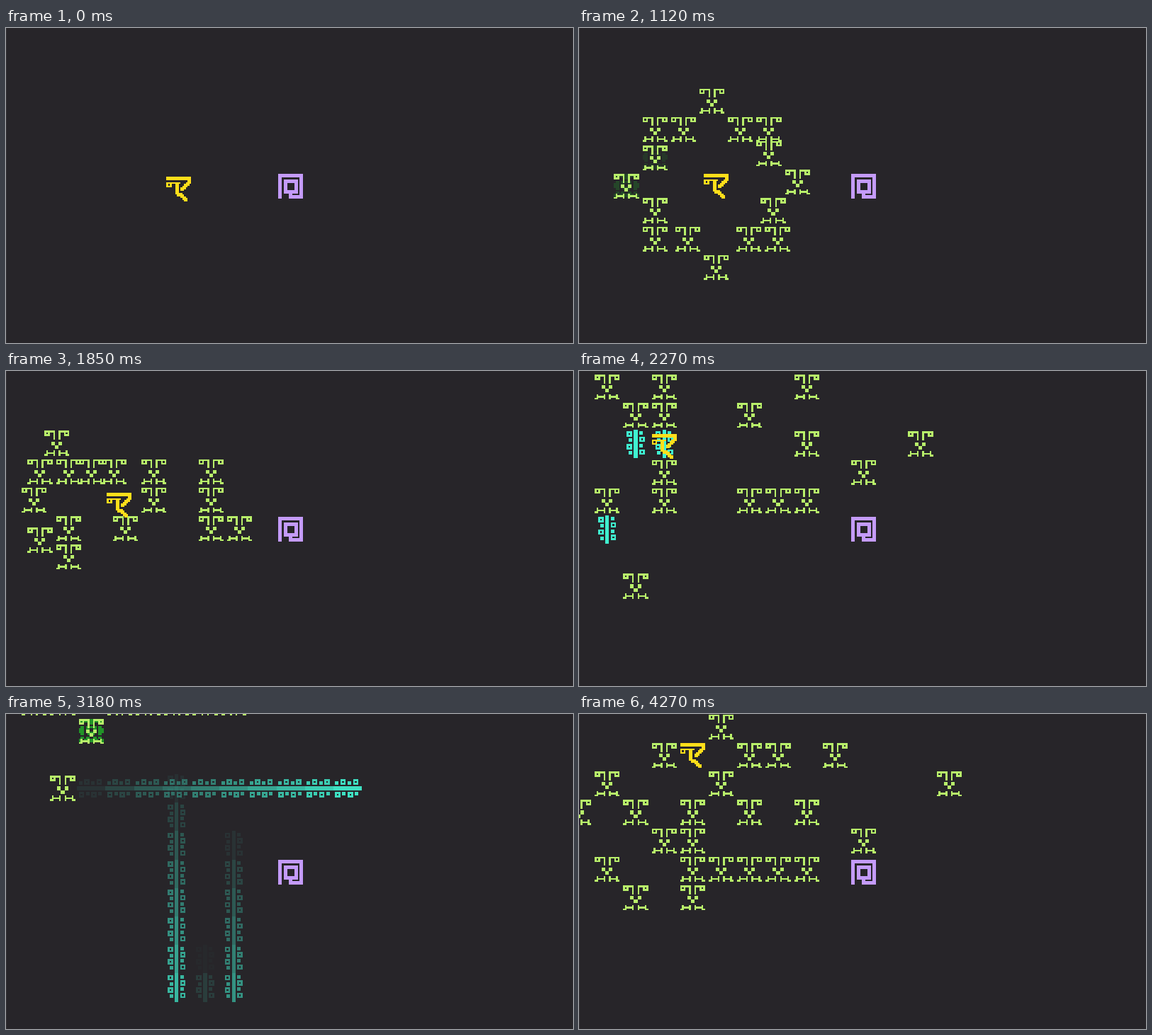
These frames come from a looping animation (800x445 px, 4300 ms). An HTML page with a canvas:

```html
<!DOCTYPE html>
<html lang="en">
<head>
<meta charset="utf-8">
<title>Pixel swarm</title>
<style>
html, body { margin: 0; width: 100%; height: 100%; overflow: hidden; background: #272529; }
canvas { display: block; }
</style>
</head>
<body>
<canvas id="stage" width="800" height="445"></canvas>
<script>
const ctx = document.getElementById('stage').getContext('2d');
const LOOP = 4300, TILE = 40.2, PX = TILE / 16, TAU = Math.PI * 2;
const GREEN = '#b8f06a', BLOB = '#20b428', YELLOW = '#ffde1a', PURPLE = '#c49bfa', CYAN = '#40f4d2';

const mirror = rows => rows.map(r => r + [...r].reverse().join(''));
const CRITTER = mirror([
  '######.', '#.#..#.', '###..#.', '.....#.', '.....#.', '.......', '....##.',
  '....##.', '......#', '......#', '.......', '.#...#.', '.#####.', '##...#.']);
const BURST = mirror([
  '##.####', '##.####', '##...##', '.......', '.##.###', '###.##.', '###.##.',
  '###..##', '.##..##', '.......', '.##.##.', '##.####', '#######', '##.....']);
const BOSS = [
  '##############', '##############', '............##', '########...###', '#.#..##...###.',
  '###..##..###..', '.....##.###...', '.....##.##....', '.....##.......', '.....####.....',
  '......####....', '........###...', '.........###..', '..........##..'];
const HERO = [
  '##############', '##############', '##..........##', '##.########.##', '##.########.##',
  '##.##....##.##', '##.##....##.##', '##.##....##.##', '##.##....##.##', '##.########.##',
  '##.########.##', '##....##....##', '##....########', '##....########'];

const clamp = (v, lo = 0, hi = 1) => Math.max(lo, Math.min(hi, v));
const easeOut = v => 1 - (1 - clamp(v)) ** 3;
const toX = col => col * TILE - 0.4;
const toY = row => row * TILE + 22.8;

// Whole turns taken so far plus the eased part of the current one.
function turns(t, start, step, limit = 99) {
  const n = clamp((t - start) / step, 0, limit);
  return Math.floor(n) + easeOut(n % 1);
}

const walk = (from, to, n) => from.map((v, i) => v + clamp(to[i] - v, -n, n));

// Formations drawn as tile maps; the first line is row `top`.
function formation(top, ...lines) {
  return lines.flatMap((line, r) => [...line.matchAll(/#/g)].map(m => [m.index, top + r]));
}

function ring(col, row) {
  const cells = [];
  for (let x = -3; x <= 3; x++)
    for (let y = -3; y <= 3; y++)
      if (Math.hypot(x, y) > 2.1 && Math.hypot(x, y) <= 3) cells.push([x, y]);
  const turn = ([x, y]) => (TAU - Math.atan2(-y, -x)) % TAU || TAU;
  return cells.sort((a, b) => turn(a) - turn(b)).map(([x, y]) => [col + x, row + y]);
}

const FAR = formation(-2, '.....#', '...#..##.#', '.#...#.......#', '#.#.#.#.#');
const STAGES = [
  { at: 1112, step: 170, cells: formation(2, '..#', '.#####.#', '.#...#.#', '.##.#..##', '..#') },
  { at: 1843, step: 110, cells: formation(-1,
    '.#.#....#', '..##..#......#', '........#', '...#......#', '.#.#..###', '', '', '..#') },
  { at: 2650, step: 110, cells: [...FAR, ...formation(2, '...#......#', '.##.#####', '...#', '', '..#')] },
  { at: 3960, step: 165, cells: [...FAR, ...formation(2, '...##.....#', '.##.#####', '....#')] }];

// Swaps goals while that shortens the walks; spare goals become newcomers.
function assign(from, goals) {
  const cost = (i, [x, y]) => from[i] ? (from[i][0] - x) ** 2 + (from[i][1] - y) ** 2 : 0;
  const out = [...goals];
  for (let changed = true; changed;) {
    changed = false;
    for (let i = 0; i < out.length; i++)
      for (let j = 0; j < i; j++)
        if (cost(i, out[j]) + cost(j, out[i]) < cost(i, out[i]) + cost(j, out[j])) {
          [out[i], out[j]] = [out[j], out[i]];
          changed = true;
        }
  }
  return out;
}

const swarm = ring(5, 5).map((cell, i) => ({ birth: 40 + i * 33, fade: 640, path: [cell] }));
STAGES.forEach(({ cells }, s) => {
  const goals = assign(swarm.map(c => c.path[s]), cells);
  goals.forEach((cell, i) => {
    swarm[i] ??= { birth: 3080, fade: 300, path: Array(s + 1).fill(cell) };
    swarm[i].path.push(cell);
  });
});

// Start time, direction, length in tiles, firing cells
const DOWN = false, RIGHT = true;
const SHOTS = [
  [2260, DOWN, 10, [1, 3]], [2350, DOWN, 10, [7, 3]], [2550, DOWN, 10, [8, 3]], [2635, DOWN, 10, [6, 3]],
  [2580, DOWN, 2, [10, 2]], [2270, DOWN, 1, [2, 0], [3, 0]],
  [2420, RIGHT, 1, [3, -1], [3, 3]], [2350, RIGHT, 2, [6, 0], [3, 2]],
  [2550, RIGHT, 4, [8, 1]], [2730, RIGHT, 10, [2, 6]]];
const SHOT_STEP = 45, SHOT_FADE = 480;

function camera(t) {
  const x = turns(t, 1480, 130, 1) - turns(t, 1113, 130, 1);
  const y = turns(t, 1843, 130, 1) - turns(t, 2594, 115, 5)
    + turns(t, 3178, 165, 1) + turns(t, 3525, 165, 5);
  return [x * TILE, y * TILE];
}

function block(x, y, c, r, w, h) {
  const l = Math.round(x + c * PX), u = Math.round(y + r * PX);
  ctx.fillRect(l, u, Math.round(x + (c + w) * PX) - l, Math.round(y + (r + h) * PX) - u);
}

function sprite(rows, color, [col, row], alpha = 1) {
  ctx.fillStyle = color;
  ctx.globalAlpha = alpha;
  rows.forEach((line, r) => {
    for (const run of line.matchAll(/#+/g))
      block(toX(col) - 7 * PX, toY(row) - 7 * PX, run.index, r, run[0].length, 1);
  });
  ctx.globalAlpha = 1;
}

function shotTile(col, row, flat, alpha) {
  const x = toX(col) - 8 * PX, y = toY(row) - 8 * PX;
  const put = (along, across, len, wide) => flat
    ? block(x, y, along, across, len, wide)
    : block(x, y, 16 - across - wide, along, wide, len);
  const box = (a, c) => {
    put(a, c, 3, 1);
    put(a, c + 2, 3, 1);
    put(a, c + 1, 1, 1);
    put(a + 2, c + 1, 1, 1);
  };
  ctx.fillStyle = CYAN;
  ctx.globalAlpha = alpha;
  put(0, 7, 16, 2);
  for (const a of [1, 8]) {
    put(a, 4, 2, 2);
    box(a + 3, 3);
    box(a, 10);
    put(a + 4, 10, 2, 2);
  }
  ctx.globalAlpha = 1;
}

function drawShots(t) {
  for (const [start, flat, length, ...cells] of SHOTS)
    for (const [col, row] of cells)
      for (let i = 1; i <= length; i++) {
        const age = t - start - (i - 1) * SHOT_STEP;
        if (age >= 0 && age < SHOT_FADE)
          shotTile(col + (flat ? i : 0), row + (flat ? 0 : i), flat, 1 - age / SHOT_FADE);
      }
}

function drawCritter({ birth, fade, path }, t) {
  const age = t - birth;
  if (age < 0) return;
  const s = Math.max(0, STAGES.findLastIndex(stage => t >= stage.at));
  const cell = walk(path[s], path[s + 1], turns(t, STAGES[s].at, STAGES[s].step));
  if (age < fade) sprite(BURST, BLOB, cell, (1 - age / fade) ** 0.6);
  sprite(CRITTER, GREEN, cell);
}

function bossCell(t) {
  let cell = walk([6.07, 5.1], [5, 5], turns(t, 150, 165));
  cell = walk(cell, [4, 4], turns(t, 1500, 165));
  cell = walk(cell, [3, 1], turns(t, 1850, 165));
  return walk(cell, [4, -1], turns(t, 2700, 165));
}

function draw(t) {
  ctx.fillStyle = '#272529';
  ctx.fillRect(0, 0, 800, 445);
  ctx.fillStyle = '#343236';
  ctx.fillRect(0, 0, 1, 445);
  ctx.save();
  ctx.translate(...camera(t).map(Math.round));
  drawShots(t);
  swarm.forEach(c => drawCritter(c, t));
  sprite(BOSS, YELLOW, bossCell(t));
  ctx.restore();
  sprite(HERO, PURPLE, [10, 5]);
}

const begin = performance.now();
function tick() {
  draw((performance.now() - begin) % LOOP);
  requestAnimationFrame(tick);
}
tick();
</script>
</body>
</html>
```
